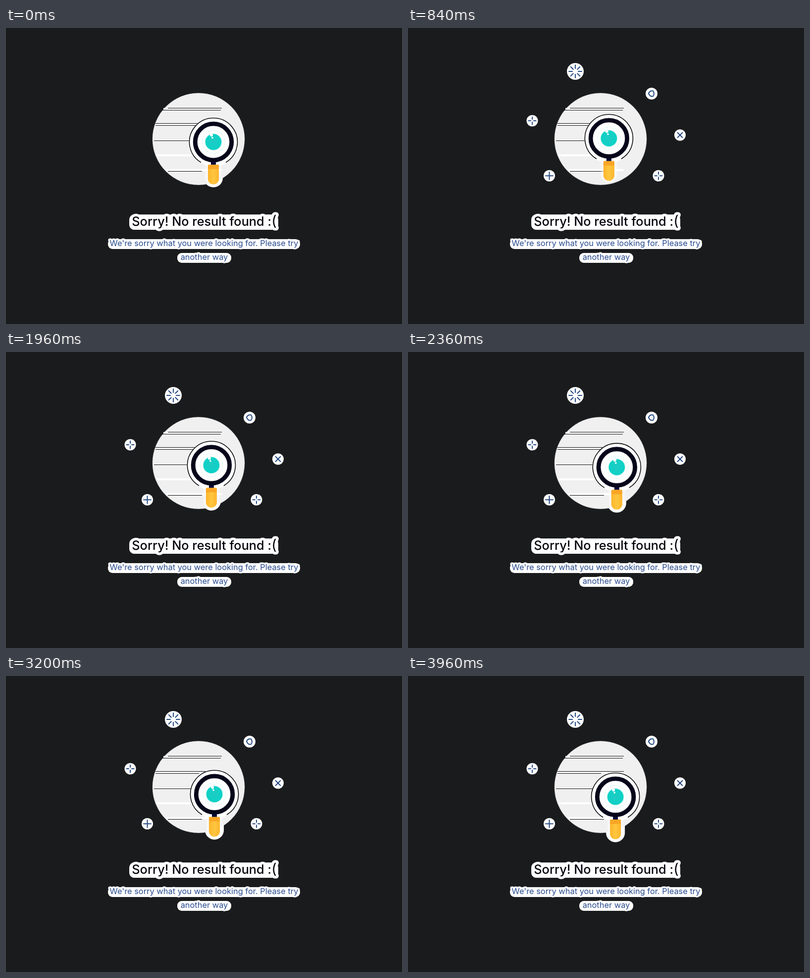
An HTML page for the animation above (4000 ms loop, 800x600 px).

```html
<!DOCTYPE html>
<html lang="en">
<head>
<meta charset="utf-8">
<title>No result</title>
<style>
  html, body { margin: 0; width: 100%; height: 100%; overflow: hidden; background: #1a1b1d; }
  svg { display: block; width: 100vw; height: 100vh; }
  text {
    font-family: Inter, "Open Sans", sans-serif; text-anchor: middle;
    paint-order: stroke; stroke: #fff; stroke-linejoin: round;
  }
  .title { font-size: 25.3px; font-weight: 500; fill: #04040c; stroke-width: 11px; }
  .big { font-size: 29px; font-weight: 400; }
  .note { font-size: 16.4px; fill: #294c8e; stroke-width: 7px; }
  .mark { fill: none; stroke: #23487f; stroke-width: 2; stroke-linecap: round; }
  .edge { stroke: #08080c; stroke-width: 1; fill: none; }
  .rim { stroke: #08080c; stroke-width: 1.6; fill: none; }
</style>
</head>
<body>
<svg viewBox="0 0 800 600">
  <defs>
    <radialGradient id="iris">
      <stop offset="0" stop-color="#20cbc4"/>
      <stop offset="1" stop-color="#0ad2c6"/>
    </radialGradient>
    <linearGradient id="grip">
      <stop offset="0" stop-color="#fdb52b"/>
      <stop offset=".5" stop-color="#ffc640"/>
      <stop offset="1" stop-color="#fdb52b"/>
    </linearGradient>
  </defs>
  <rect width="800" height="600" fill="#1a1b1d"/>

  <g class="lens">
    <path d="M-19 40H19V73A19 19 0 0 1 -19 73Z" fill="#fff"/>
  </g>

  <circle cx="389" cy="225" r="93" fill="#f0f0f0"/>
  <circle cx="389" cy="225" r="93" fill="none" stroke="#fff" stroke-dasharray="1 2"/>
  <g id="bars"></g>

  <g class="lens">
    <path d="M-16 44H16V74A16 16 0 0 1 -16 74Z" fill="#fff" opacity=".45"/>
    <circle r="49.5" fill="#fff"/>
    <path class="rim" d="M-25 41.6A48.5 48.5 0 1 1 25 41.6"/>
    <rect x="-5" y="39" width="10" height="8" fill="#090b37"/>
    <circle r="36.8" fill="#fff" stroke="#06051a" stroke-width="8.8"/>
    <circle r="23" fill="none" stroke="#6fd6d0" stroke-dasharray="1 3"/>
    <circle r="18" fill="#e2f8f6"/>
    <circle r="16.3" fill="url(#iris)"/>
    <circle cx="-4" cy="-14" r="3" fill="#fff"/>
    <circle cx="-2" cy="-8.5" r="1.8" fill="#fff"/>
    <path d="M-11 48Q-11 46 -9 46H9Q11 46 11 48V75A11 11 0 0 1 -11 75Z" fill="url(#grip)"/>
    <path d="M-11 55V48Q-11 46 -9 46H9Q11 46 11 48V55Z" fill="#f9a626"/>
  </g>

  <g id="marks"></g>

  <g fill="#fff">
    <rect x="249" y="378" width="301" height="31" rx="10"/>
    <rect x="206" y="428" width="388" height="20" rx="9"/>
    <rect x="346" y="456" width="109" height="20" rx="9"/>
  </g>
  <text class="title" x="400.5" y="401">Sorry! No result found :<tspan class="big">(</tspan></text>
  <text class="note" x="400" y="442">We're sorry what you were looking for. Please try</text>
  <text class="note" x="400.5" y="470">another way</text>
</svg>
<script>
const LOOP = 4000, STEP = 40;
const $ = id => document.getElementById(id);

// Lens path: time, x, y, straight between the points
const path = [[0, 419, 231], [1150, 401, 221], [2430, 423, 234.3], [LOOP, 419, 245.2]];

// White bars: left, y, height, then dark edges as [left, y, right]
const bars = [
  [318, 162, 4, [[327, 162.5, 436], [316, 166.5, 434]]],
  [302, 194, 3, [[302, 193.5, 436], [302, 197.5, 390]]],
  [299, 226, 2, [[299, 228.5, 404]]],
  [303, 256, 4, []],
  [324, 286, 4, [[327, 290.5, 396]]]
];
$('bars').innerHTML = bars.map(([x, y, h, edges]) =>
  `<rect x="${x}" y="${y}" width="${436 - x}" height="${h}" rx="1" fill="#fff"/>` +
  edges.map(([a, b, c]) => `<path class="edge" d="M${a} ${b}H${c}"/>`).join('')
).join('');

// n rays around the centre, from radius a to radius b
const rays = (n, a, b, turn = 0) => Array.from({ length: n }, (_, i) => {
  const k = turn + i * 2 * Math.PI / n, c = Math.cos(k), s = Math.sin(k);
  return `M${a * c} ${a * s}L${b * c} ${b * s}`;
}).join('');

const marks = [
  [338, 88, 17, rays(8, 6, 13)],
  [492, 133, 12, 'M-1 -5.5H3Q5 -3 5 0Q5 3 3 5.5H-1Q-4 4 -6 0Q-5 -4 -1 -5.5Z'],
  [251, 188, 11.5, rays(4, 3, 7.5)],
  [549.5, 217, 11.5, rays(4, 0, 7, Math.PI / 4)],
  [285.5, 299.5, 11.5, rays(4, 0, 7.5)],
  [506, 299.5, 11.5, rays(4, 3, 7.5)]
];
$('marks').innerHTML = marks.map(([x, y, r, d]) =>
  `<g transform="translate(${x} ${y})"><circle r="${r}" fill="#fff"/><path class="mark" d="${d}"/></g>`
).join('');

const lenses = document.querySelectorAll('.lens');
const strokes = document.querySelectorAll('.mark');

function draw(t) {
  const i = path.findIndex(p => p[0] > t);
  const [t0, x0, y0] = path[i - 1], [t1, x1, y1] = path[i];
  const k = (t - t0) / (t1 - t0);
  const place = `translate(${x0 + (x1 - x0) * k} ${y0 + (y1 - y0) * k})`;
  lenses.forEach(el => el.setAttribute('transform', place));

  $('marks').setAttribute('visibility', t < STEP ? 'hidden' : 'visible');
  const fade = Math.min(1, t / 500);
  strokes.forEach(el => el.setAttribute('opacity', fade));
}

function tick() {
  draw(Math.floor(performance.now() % LOOP / STEP) * STEP);
  requestAnimationFrame(tick);
}
tick();
</script>
</body>
</html>
```
